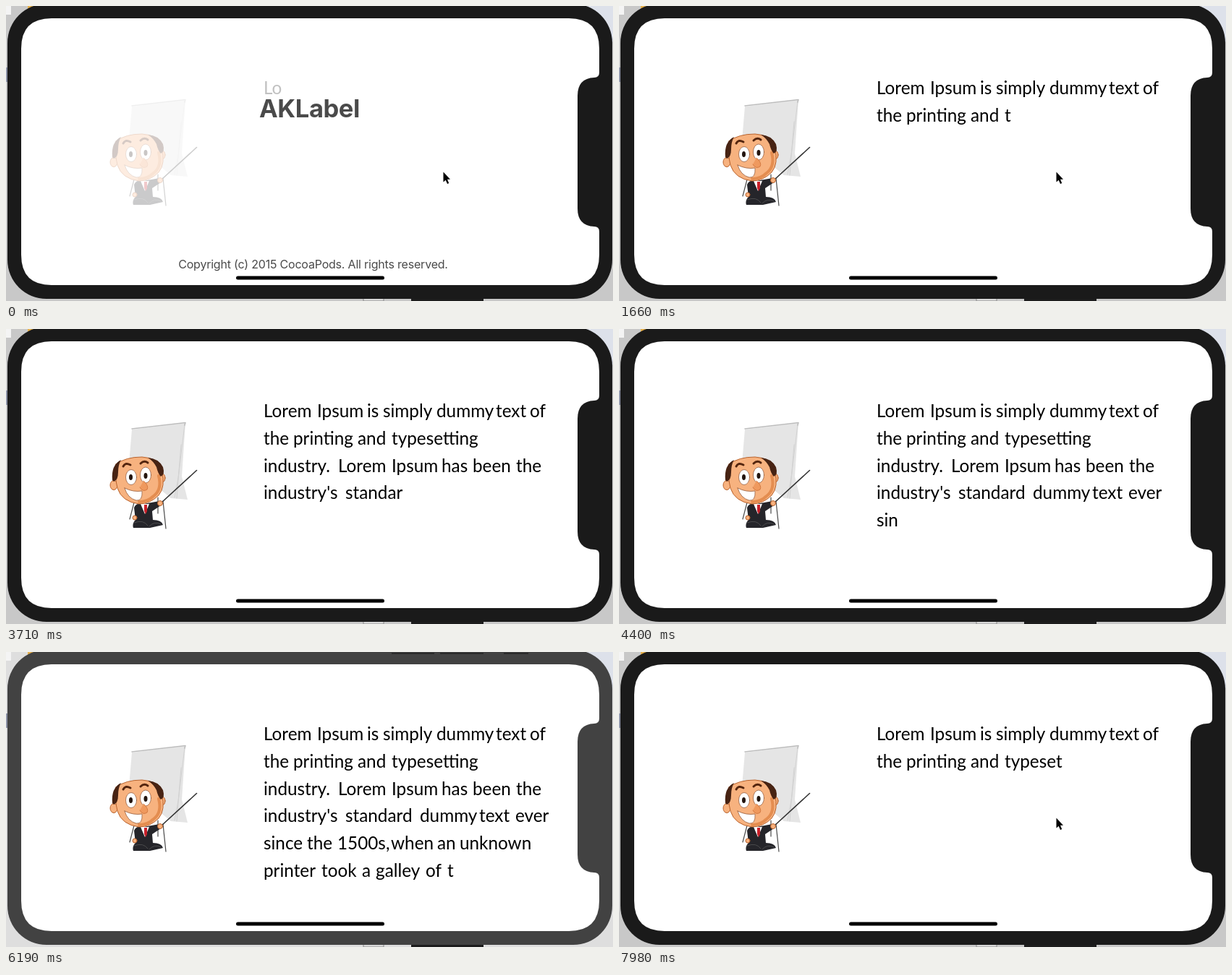
Animation of 839x408 px, one loop 8 s. Source, as an HTML page:

```html
<!DOCTYPE html>
<html lang="en">
<head>
<meta charset="utf-8">
<title>Typing label</title>
<style>
html, body { margin: 0; width: 100%; height: 100%; overflow: hidden; background: #ccc; }
svg { display: block; width: 839px; height: 408px; }
#label { font: 24.3px Lato, sans-serif; }
#launch { font-family: Inter, sans-serif; text-anchor: middle; fill: #111; }
#bezel { fill: #1a1a1a; }
#desk { fill: #c8c8c8; }
.flash #bezel { fill: #424242; }
.flash #desk { fill: #dedede; }
</style>
</head>
<body>
<svg id="stage" viewBox="0 0 839 408">
  <rect id="desk" width="839" height="408"/>
  <path d="M0 0H7V12H0Z" fill="#f4f4f4"/>
  <path d="M30 0H46V4H30Z" fill="#e5b04c"/>
  <path d="M800 0H839V50Z" fill="#dde1ea"/>
  <path d="M0 85H3V105H0Z" fill="#8d93a6"/>
  <path d="M494 403H522V408H494Z" fill="#d8d8d8" stroke="#888"/>
  <path d="M560 403H660V408H560Z" fill="#1d1d1d"/>
  <rect id="bezel" x="2" y="-3" width="836" height="408" rx="54"/>
  <path id="marks" d="M533 2H592M600 2H660M688 2H722" stroke="#2a2a2a" stroke-width="2"/>
  <path fill="#fff" d="M63 17H778Q820 17 820 59V92Q820 99 813 99Q790 100 790 124V280Q790 304 813 305Q820 305 820 312V344Q820 386 778 386H63Q21 386 21 344V59Q21 17 63 17Z"/>

  <g id="teacher" stroke-linecap="round" stroke-linejoin="round">
    <path d="M174 139L248 130L243 204L251 236L228 234L170 186Z" fill="#e5e5e5"/>
    <path d="M247 132L238 206L233 233M242 160L236 234" fill="none" stroke="#d2d2d2"/>
    <path d="M174 138L248 129.500L247 133" fill="none" stroke="#bdbdbd" stroke-width="1.500"/>
    <path d="M177 240L171 263M210 233V255M217 238L221 276" stroke="#4a4a4a" stroke-width="1.200"/>
    <path d="M215 240L263.500 195.500" stroke="#333" stroke-width="1.600"/>
    <path d="M177 247Q180 240 190 242L212 238L214 244L202 252L203 264Q215 264 217 271L199 275H176Q174 269 179 264Z" fill="#25252a"/>
    <path d="M177 268Q190 263 196 272M198 273Q205 265 214 270" fill="none" stroke="#555" stroke-width=".8"/>
    <path d="M186 242L192 256L198 242Z" fill="#fff"/>
    <path d="M191 243H195L195 252L193 256L191 252Z" fill="#c8202a"/>
    <g fill="#f7b27f" stroke="#b9622c">
      <circle cx="213" cy="241" r="3.500"/>
      <circle cx="178" cy="261" r="3"/>
      <ellipse cx="149" cy="216" rx="5" ry="6.500"/>
      <ellipse cx="216" cy="206" rx="4" ry="6"/>
      <path d="M152 187Q165 177 188 177Q211 178 215 196Q221 218 211 230Q199 242 184 242Q160 239 154 220Q150 204 152 187Z"/>
    </g>
    <path d="M211 203Q216 222 204 231Q196 239 184 239" fill="none" stroke="#e48d50" stroke-width="4"/>
    <path d="M147 209Q145 188 159 181Q155 188 155 198Q155 209 149 211Z" fill="#472313"/>
    <path d="M196 178Q211 179 217 191Q220 202 214 204Q210 200 208 191Q204 183 196 178Z" fill="#472313"/>
    <path d="M162 190Q165 184 172 188M186 186Q191 181 196 185" fill="none" stroke="#55260f" stroke-width="3"/>
    <g fill="#fff" stroke="#8a5030" stroke-width=".7">
      <ellipse cx="173" cy="205" rx="7.500" ry="10.500"/>
      <ellipse cx="193" cy="202" rx="7.500" ry="11"/>
      <path d="M164 220Q176 226 188 224Q189 238 180 237Q168 234 164 220Z"/>
    </g>
    <ellipse cx="172.500" cy="205" rx="2.500" ry="4" fill="#23150f"/>
    <ellipse cx="193" cy="203" rx="2.500" ry="4" fill="#23150f"/>
    <path d="M190 210Q198 217 195 222Q189 226 185 219" fill="#ef995e" stroke="#d47a42"/>
  </g>

  <g id="label"></g>

  <g id="launch">
    <rect x="100" y="60" width="680" height="310" fill="#fff"/>
    <text x="419.500" y="154" font-size="34.500" font-weight="700" letter-spacing="-.4">AKLabel</text>
    <text x="424.500" y="363" font-size="16" letter-spacing="-.2">Copyright (c) 2015 CocoaPods. All rights reserved.</text>
  </g>

  <path d="M320.500 376H520.500" stroke="#000" stroke-width="5" stroke-linecap="round"/>
  <path id="cursor" d="M604.500 229.500V243.500L607.700 240.700L610 246L612.200 245L610 239.800H614Z" stroke="#fff" stroke-width="1" paint-order="stroke"/>
</svg>
<script>
const LOOP = 8000, FLASH = 6190, RESTART = 6290;
const $ = id => document.getElementById(id);

// each line: the left edge of a word, then the word
const lines = [
  '356 Lorem 430 Ipsum 499 is 521 simply 595 dummy 677 text 724 of',
  '356 the 397 printing 486 and 533 typesetting',
  '356 industry. 459 Lorem 533 Ipsum 602 has 645 been 705 the',
  "356 industry's 469 standard 572 dummy 654 text 704 ever",
  '356 since 416 the 458 1500s, 532 when 596 an 627 unknown',
  '356 printer 436 took 492 a 511 galley 580 of 610 the'
];

const words = [];
let total = 0;
lines.forEach((line, row) => {
  const parts = line.split(' ');
  for (let i = 0; i < parts.length; i += 2) {
    const node = document.createElementNS('http://www.w3.org/2000/svg', 'text');
    node.setAttribute('x', parts[i]);
    node.setAttribute('y', 122 + row * 37.8);
    $('label').append(node);
    words.push({ node, text: parts[i + 1], start: total });
    total += parts[i + 1].length + 1;
  }
});

// time on the typing clock; it stalls before the flash, then starts over
function typingTime(t) {
  if (t < FLASH) return Math.min(t, 6030);
  return t < RESTART ? FLASH : t - 6140;
}

function draw(now) {
  const t = now % LOOP;
  const clock = typingTime(t);
  const flash = t >= FLASH && t < RESTART;
  const typed = Math.floor(Math.min(2.6 + clock * 0.0325, 3 + clock * 0.03105));

  for (const w of words)
    w.node.textContent = w.text.slice(0, Math.max(0, typed - w.start));

  $('launch').setAttribute('opacity', Math.max(0, 0.76 * (1 - clock / 200)));
  $('cursor').setAttribute('visibility', clock < 3050 ? 'visible' : 'hidden');
  $('marks').setAttribute('visibility', flash ? 'visible' : 'hidden');
  $('stage').classList.toggle('flash', flash);
}

const begin = performance.now();
function tick() {
  draw(performance.now() - begin);
  requestAnimationFrame(tick);
}
tick();
</script>
</body>
</html>
```
